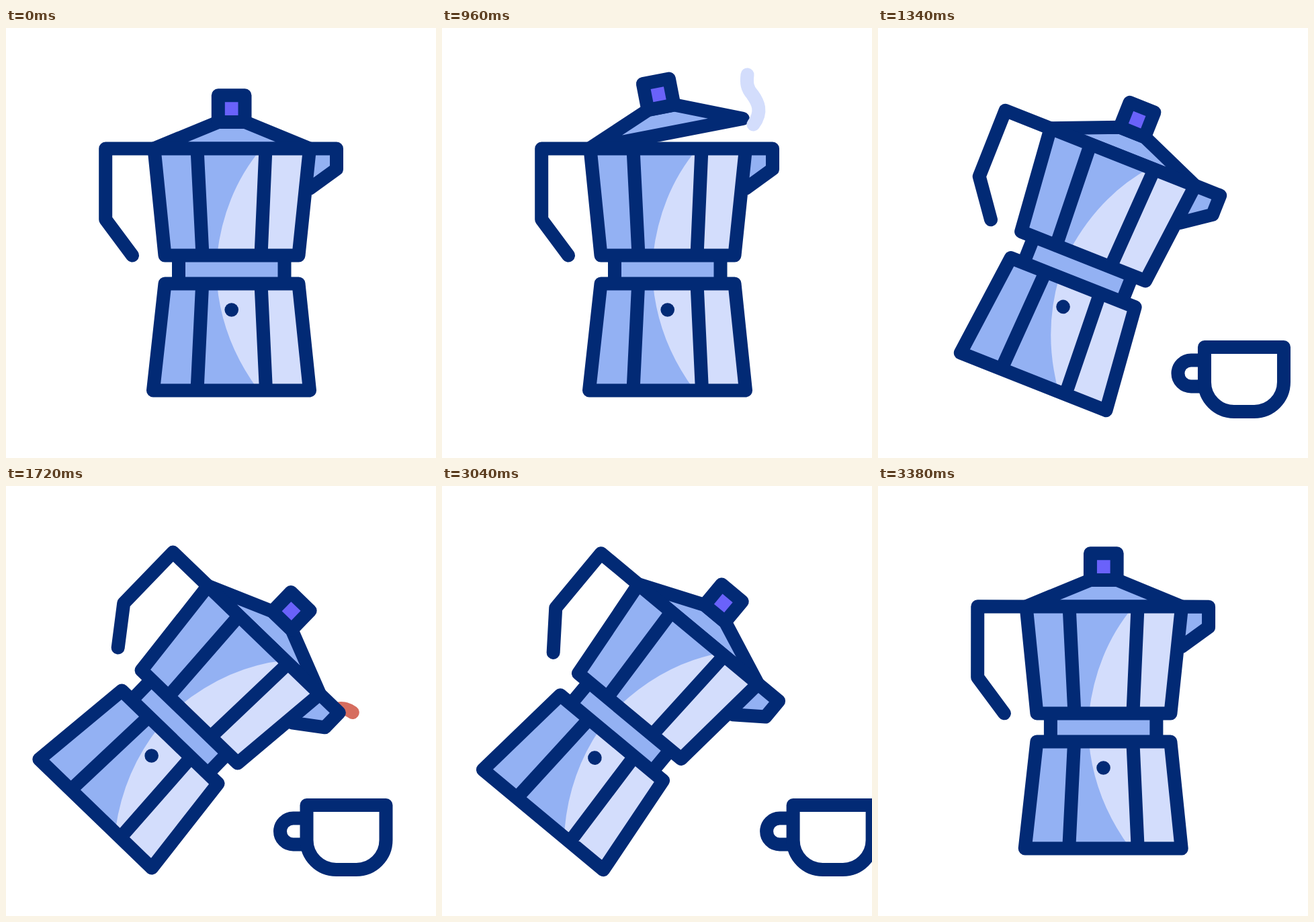
An HTML page that plays this animation: 640x640 px, repeating every 3600 ms.

```html
<!DOCTYPE html>
<html lang="en">
<head>
<meta charset="utf-8">
<title>Moka pot</title>
<style>
  html, body { margin: 0; width: 100%; height: 100%; overflow: hidden; background: #fff; }
  svg { display: block; width: 100vw; height: 100vh; }
  .line { fill: none; stroke: #022a75; stroke-width: 20; stroke-linecap: round; stroke-linejoin: round; }
  .flow { fill: none; stroke-width: 20; stroke-linecap: round; }
  .mid { fill: #93b1f3; }
  .light { fill: #d3ddfc; }
</style>
</head>
<body>
<svg viewBox="0 0 640 640">
  <path id="coffee" class="flow" stroke="#d66d5f" pathLength="1"
    d="M493 333Q495 331 499 331C521 331 543 362 543 412C543 434 540 452 534 475"/>

  <g id="cup">
    <path class="line" d="M447.5 494.5H427.5a19.5 19.5 0 0 0 0 39H447.5"/>
    <path class="line" style="fill:#fff" d="M447.5 475H565.5V527a44 44 0 0 1-44 44H491.5a44 44 0 0 1-44-44Z"/>
  </g>

  <g id="pot">
    <g id="lid">
      <path class="line" style="fill:#93b1f3" d="M220 179.5L316 140H356L452 179.5Z"/>
      <path class="line" style="fill:#6a62fa" d="M315.8 100.3H355.5V140H315.8Z"/>
    </g>

    <path class="mid" d="M220 179.5H492V210L452 239L435.5 338.5H236.5ZM257 338H414.5V381H257ZM236.5 380.5H435.5L452 539.5H219Z"/>
    <path class="light" d="M380 179.5Q325 245 314 338.5H435.5L452 179.5ZM314 380.5Q322 467 376 539.5H452L435.5 380.5Z"/>

    <path class="line" d="M220.5 179.5H148.2V285L188 338.5
      M452 179.5H492V210L452 239
      M220.5 179.5H452L435.5 338.5H236.5Z
      M284.5 179.5L292.5 338.5M386.5 179.5L379.5 338.5
      M257 338.5V380.5M414.5 338.5V380.5
      M236.5 380.5H435.5L452 539.5H219Z
      M292.2 380.5L284.5 539.5M379.5 380.5L387 539.5"/>
    <circle cx="335.7" cy="419.5" r="10.3" fill="#022a75"/>
  </g>

  <path id="steam" class="flow" stroke="#d3ddfc" pathLength="1"
    d="M463 144C478 125 470 110 462 99C452 88 453 78 456 59"/>
</svg>
<script>
  const LOOP = 3600;
  const [coffee, cup, pot, lid, steam] =
    ['coffee', 'cup', 'pot', 'lid', 'steam'].map(id => document.getElementById(id));

  const ramp = (t, from, to) => Math.min(1, Math.max(0, (t - from) / (to - from)));
  const ease = (t, from, to) => {
    const s = ramp(t, from, to);
    return s * s * (3 - 2 * s);
  };

  // Shows only the stretch of a path between two fractions of its length.
  function trim(path, start, end) {
    const size = end - start;
    path.style.display = size > 0.002 ? '' : 'none';
    path.setAttribute('stroke-dasharray', `${size} 3`);
    path.setAttribute('stroke-dashoffset', -start);
  }

  function draw(t) {
    const open = ease(t, 100, 500) - ease(t, 960, 1200);
    lid.setAttribute('transform', `rotate(${-11 * open} 218 179.5)`);

    trim(steam, ease(t, 950, 1195), ease(t, 440, 1100));

    const tilt = ease(t, 1010, 1680) - ease(t, 2958, 3390);
    pot.setAttribute('transform', `translate(${-75 * tilt} 0) rotate(${44 * tilt} 336 356)`);

    const away = 1 - ease(t, 960, 1460) + ease(t, 2900, 3305);
    cup.setAttribute('transform', `translate(${269 * away} 0)`);

    trim(coffee, ramp(t, 2505, 2840), ramp(t, 1630, 2265));
  }

  const begin = performance.now();
  function tick() {
    draw((performance.now() - begin) % LOOP);
    requestAnimationFrame(tick);
  }
  tick();
</script>
</body>
</html>
```
